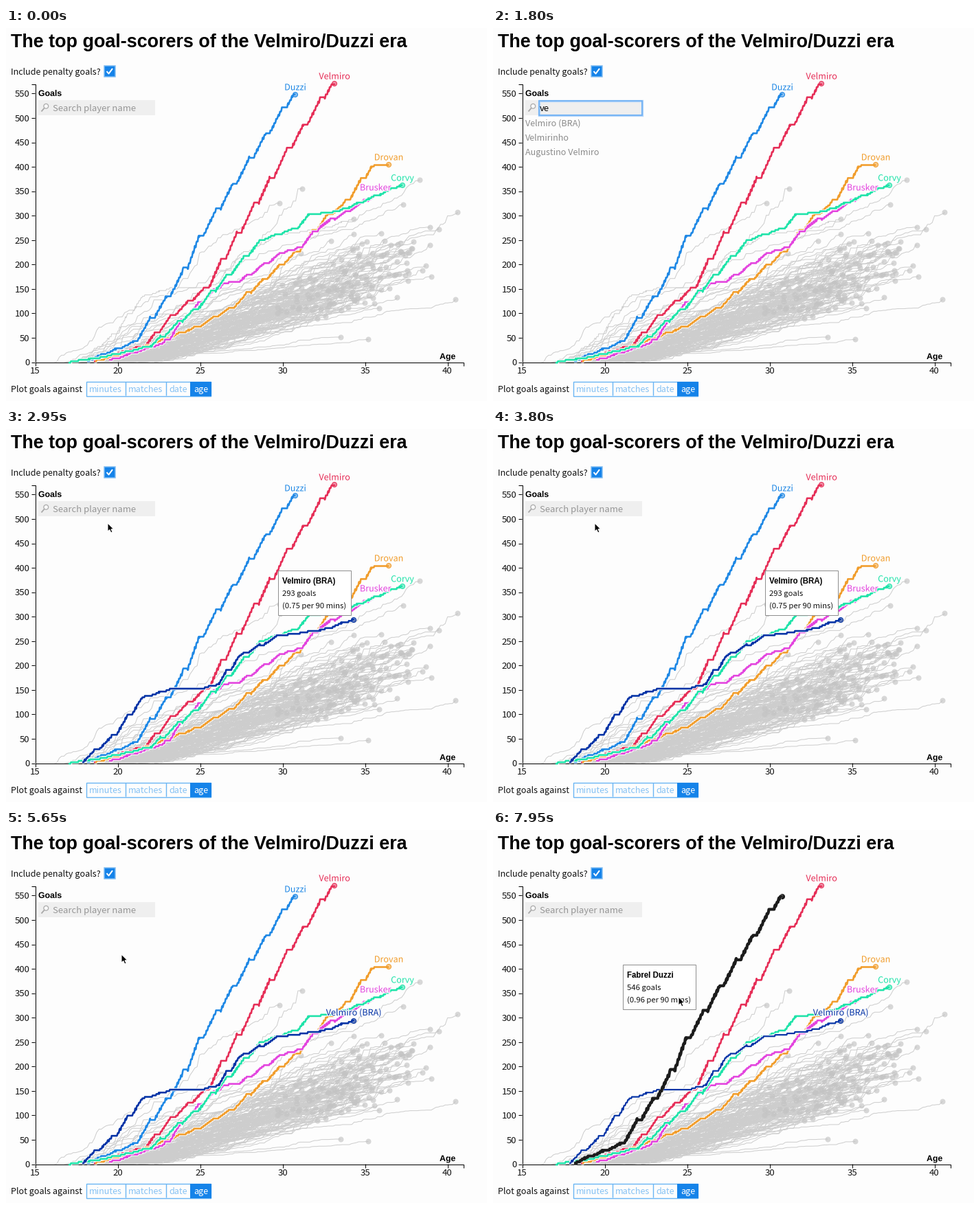
A matplotlib script that plays this animation: 700x543 px, repeating every 8000 ms.

```python
import numpy as np
import matplotlib.pyplot as plt
from matplotlib.animation import FuncAnimation
from matplotlib.collections import LineCollection
from matplotlib.patches import Circle, Polygon, Rectangle
from matplotlib.patheffects import withStroke

W, H, DPI = 700, 543, 64
PX = 72 / DPI                      # points per pixel
FRAMES, STEP = 160, 50
BASE, YEAR = 486, 24               # y of zero goals, pixels per year of age
BG, BLUE, PALE, GREY = "#fdfdfd", "#1583e9", "#6bb6f4", "#cdcdcd"
NAVY, MID, INK = "#0433a6", "#1f88e5", "#1c1c1c"

fig = plt.figure(figsize=(W / DPI, H / DPI), dpi=DPI, facecolor=BG)
ax = fig.add_axes([0, 0, 1, 1])
ax.set_xlim(0, W)
ax.set_ylim(H, 0)
ax.axis("off")
rng = np.random.default_rng(5)


def halo(px):
    return [withStroke(linewidth=px * PX, foreground=BG)] if px else None


def text(x, y, s, size=12.6, color="#111111", bold=False, ha="left", z=5, glow=0):
    font = "Liberation Sans" if bold else "Noto Sans CJK JP"
    return ax.text(x, y, s, fontsize=size * PX, color=color, family=font,
                   weight="bold" if bold else "normal", ha=ha, va="baseline",
                   zorder=z, path_effects=halo(glow))


def line(xs, ys, color="black", px=1.0, z=2, glow=0):
    return ax.plot(xs, ys, color=color, lw=px * PX, zorder=z,
                   solid_joinstyle="round", solid_capstyle="butt",
                   path_effects=halo(glow))[0]


def rect(x0, y0, x1, y1, face, edge="none", px=1.0, z=4):
    return ax.add_patch(Rectangle((x0, y0), x1 - x0, y1 - y0, facecolor=face,
                                  edgecolor=edge, lw=px * PX, zorder=z))


def disc(x, y, r, face, edge="none", px=1.0, z=5, alpha=None):
    return ax.add_patch(Circle((x, y), r, facecolor=face, edgecolor=edge,
                               lw=px * PX, zorder=z, alpha=alpha))


def show(artists, on):
    for a in artists:
        a.set_visible(on)


# ---- page furniture
text(7, 28, "The top goal-scorers of the Velmiro/Duzzi era", 26.9, "black", True)
text(7, 68, "Include penalty goals?")
rect(143, 55, 158.5, 70.5, BLUE, "#7fbdf3", 1.5)
line([146.5, 149.5, 155], [63, 66.5, 59], "white", 2, 5)
text(47, 99, "Goals", 12.3, "black", True, glow=2)
text(631, 482, "Age", 12.3, "black", True, glow=2)

line([37, 42.5, 42.5], [81.5, 81.5, BASE])
line([42.5, 666, 666], [BASE + .5, BASE + .5, BASE + 6])
for goals in range(0, 551, 50):
    y = BASE + .5 - goals * 0.711
    line([37, 42], [y, y])
    text(34.5, y + 4.8, str(goals), 13.2, ha="right")
for age in range(15, 41, 5):
    x = 42.5 + (age - 15) * YEAR
    line([x, x], [BASE, BASE + 6])
    text(x, 503, str(age), 13.2, ha="center")

text(7, 530, "Plot goals against")
rect(116.5, 515, 298, 535.5, "none", PALE, 1.4)
rect(268, 514.5, 298.5, 536, BLUE)
for x in (173.5, 232.5):
    line([x, x], [515, 535], PALE, 1.4, 4)
for x, word in ((145, "minutes"), (203, "matches"), (250.5, "date")):
    text(x, 530, word, color="#86c2f4", ha="center")
text(283.5, 530, "age", color="white", ha="center")
line([0, W], [542.5, 542.5], "#8a8a8a")


# ---- coloured careers
def career(phase, *pts):
    """Trend through a few points, paused each summer and scored goal by goal."""
    px, py = np.array(pts, float).T
    xs = np.append(np.arange(px[0], px[-1], 0.7), px[-1])
    season, part = np.divmod((xs - phase) / YEAR, 1)
    played = phase + YEAR * (season + np.minimum(part / 0.75, 1))
    ys = np.interp(played + 1.2 * np.sin(played * 1.7), px, py)
    ys = np.round(ys / 2.1) * 2.1
    ys[-1] = py[-1]
    return xs, ys


def star(path, name, color, z, rise=6.5, dx=0, tip=True):
    xs, ys = path
    x, y = xs[-1], ys[-1]
    stroke = line(xs, ys, color, 2.6, z, 4.6)
    dots = [disc(x, y, 3.5, color, z=z, alpha=.55),
            disc(x, y, 3.5, "none", color, z=z)] if tip else []
    label = text(x + dx, y - rise, name, color=color, ha="center", z=6, glow=2.5)
    return stroke, dots, label


velmiro = career(7, (128, 486), (207, 461), (246, 418), (297, 376), (344, 294),
                 (415, 176), (478, 81))
duzzi = career(0, (118, 486), (190, 457), (238, 392), (261, 357), (286, 304),
               (360, 189), (421, 97))
drovan = career(20, (130, 486), (200, 466), (283, 434), (333, 406), (428, 324),
                (470, 274), (497, 255), (535, 201), (557, 199))
brusker = career(22, (150, 485), (235, 458), (264, 420), (318, 372), (342, 369),
                 (408, 325), (428, 322), (460, 289), (541, 243))
corvy = career(16, (91, 487), (150, 478), (213, 463), (283, 406), (376, 308),
               (426, 291), (445, 272), (490, 266), (577, 229))
bra = career(16, (111, 486), (160, 447), (201, 392), (240, 379), (290, 378),
             (312, 371), (342, 331), (400, 301), (467, 292), (506, 278))

star(velmiro, "Velmiro", "#e62e57", 3)
top = star(duzzi, "Duzzi", MID, 3.1)
star(drovan, "Drovan", "#f19d2c", 3.2)
star(brusker, "Brusker", "#e344de", 3.3, dx=-3.5, tip=False)
star(corvy, "Corvy", "#1fe3a9", 3.4)
added = star(bra, "Velmiro (BRA)", NAVY, 3.5, rise=8)


# ---- grey careers
def grey_career(x0, x1, y1):
    xs = np.append(np.arange(x0, x1, 3.4), x1)
    season = ((xs + rng.uniform(0, YEAR)) // YEAR).astype(int)
    form = rng.gamma(8, 1, season.max() + 1)[season]
    gain = form * rng.gamma(1.2, 1, len(xs)) * (rng.random(len(xs)) > .3)
    gain *= 0.4 + 0.6 * np.minimum(1, (xs - x0) / 80)
    gain[0] = 0
    total = np.cumsum(gain)
    return np.column_stack([xs, BASE - (BASE - y1) * total / total[-1]])


paths = [np.column_stack(bra)]
outliers = [(431, 234), (398, 255), (602, 221), (657, 268), (654, 395), (619, 362),
            (527, 453), (487, 450), (578, 257), (630, 293)]
for x1, y1 in outliers:
    paths.append(grey_career(rng.uniform(54, 160), x1, y1))
for _ in range(135):
    x0 = np.clip(rng.normal(158, 30), 85, 225)
    x1 = np.clip(rng.normal(505, 58), 395, 617)
    rate = 0.35 * np.exp(rng.normal(0, 0.26))
    paths.append(grey_career(x0, x1, max(BASE - rate * (x1 - x0), rng.uniform(285, 330))))
ax.add_collection(LineCollection(paths, colors=GREY, linewidths=PX, zorder=1))
ax.scatter(*np.array([p[-1] for p in paths]).T, s=(8 * PX) ** 2, c="#c3c3c3",
           alpha=.65, linewidths=0, zorder=1.5)

# ---- search box
rect(47, 105, 217, 127, "#efefef")
disc(58.3, 113.8, 3.4, "#f8f8f8", "#a9a9a9", 1.2)
line([55.8, 51.5], [116.5, 121.5], "#a9a9a9", 1.8, 5)
hint = text(68, 121, "Search player name", 13.1, "#979797")
focus = [rect(67, 106, 217, 126.5, "#efefef", "#b5d6fa", 3.4, 5),
         rect(67, 106, 217, 126.5, "none", "#69adf3", 1.6, 5.1)]
typed = text(68, 121, "", 13.1, "black", z=6)
caret = line([70, 70], [109, 123], "black", 1, 6)
names = ["Velmiro (BRA)", "Velmirinho", "Augustino Velmiro"]
row = rect(47, 128, 217, 148, "#e4e4e4")
options = [text(47, 142.5 + 21 * i, s, color="#8c8c8c") for i, s in enumerate(names)]


# ---- tooltips
def tooltip(x, y, name, goals, rate):
    return [rect(x + .5, y + .5, x + 106.5, y + 66, "white", "#8f8f8f", 1, 20),
            text(x + 7, y + 20, name, 11.5, "black", True, z=21),
            text(x + 7, y + 38, f"{goals} goals", 11.3, z=21),
            text(x + 7, y + 56, f"({rate} per 90 mins)", 11.3, z=21)]


tip_bra = tooltip(395, 205, names[0], 293, "0.75")
tip_top = tooltip(188, 195, "Fabrel Duzzi", 546, "0.96")

# ---- pointer
ARROW = np.array([(0, 0), (0, 12.2), (2.8, 9.6), (4.8, 14), (7, 13), (5, 8.8), (8.8, 8.8)])
HAND = np.array([(-1, 0), (1, 0), (1.6, 5.2), (8, 7), (8.8, 10.5), (7.3, 14.5),
                 (1.3, 14.5), (-3.8, 8.8), (-2.6, 7.3), (-.8, 8.8)])
BEAM = np.array([(-3, -7), (0, -6), (3, -7), (0, -6), (0, 6.5), (-3, 7.5), (0, 6.5), (3, 7.5)])
arrow = ax.add_patch(Polygon(ARROW, facecolor="black", edgecolor="white", lw=PX, zorder=30))
hand = ax.add_patch(Polygon(HAND, facecolor="white", edgecolor="black", lw=PX, zorder=30))
beam = line(*BEAM.T, "black", 1.2, 30)

# each move: start ms, end ms, destination
MOVES = [(250, 950, 188, 109), (2000, 2350, 150, 132), (2550, 2700, 148, 137),
         (4050, 4600, 168, 181), (5900, 6400, 219, 216), (7300, 7900, 270, 243)]


def pointer(ms):
    pos = np.array([300.0, -16.0])
    for start, end, x, y in MOVES:
        u = np.clip((ms - start) / (end - start), 0, 1)
        pos += u * u * (3 - 2 * u) * (np.array([x, y]) - pos)
    return pos


def update(i):
    ms = i * STEP
    pos = pointer(ms)
    x, y = pos

    focused = 1100 <= ms < 2700
    letters = int(np.clip((ms - 1300) // 200, 0, 3)) if focused else 0
    hovering = letters > 0 and y > 127
    hint.set_visible(not focused)
    show(focus, focused)
    typed.set_text("vel"[:letters])
    caret.set_visible(1100 <= ms < 1250)
    show(options, letters > 0)
    row.set_visible(hovering)
    options[0].set_color("#222222" if hovering else "#8c8c8c")

    picked = ms >= 2700
    told = 2700 <= ms < 4300
    stroke, dots, label = added
    show([stroke, *dots], picked)
    label.set_visible(picked and not told)
    show(tip_bra, told)

    hot = ms > 7300 and x > 245
    stroke.set_linewidth((2.2 if hot else 2.6) * PX)
    stroke, dots, label = top
    color = INK if hot else MID
    stroke.set(color=color, linewidth=(4.2 if hot else 2.6) * PX, zorder=4 if hot else 3.1)
    dots[0].set(facecolor=color, alpha=1 if hot else .55)
    dots[1].set_edgecolor(color)
    label.set_visible(not hot)
    show(tip_top, hot)

    in_box = x < 217 and 104 < y < 127.5 and not picked
    beam.set_visible(in_box and not 1500 <= ms < 2000)
    hand.set_visible(hovering)
    arrow.set_visible(not in_box and not hovering)
    arrow.set_xy(ARROW + pos)
    hand.set_xy(HAND + pos)
    beam.set_data(*(BEAM + pos).T)
    return []


anim = FuncAnimation(fig, update, frames=FRAMES, interval=STEP, repeat=True,
                     repeat_delay=0, blit=False)
plt.show()
```
